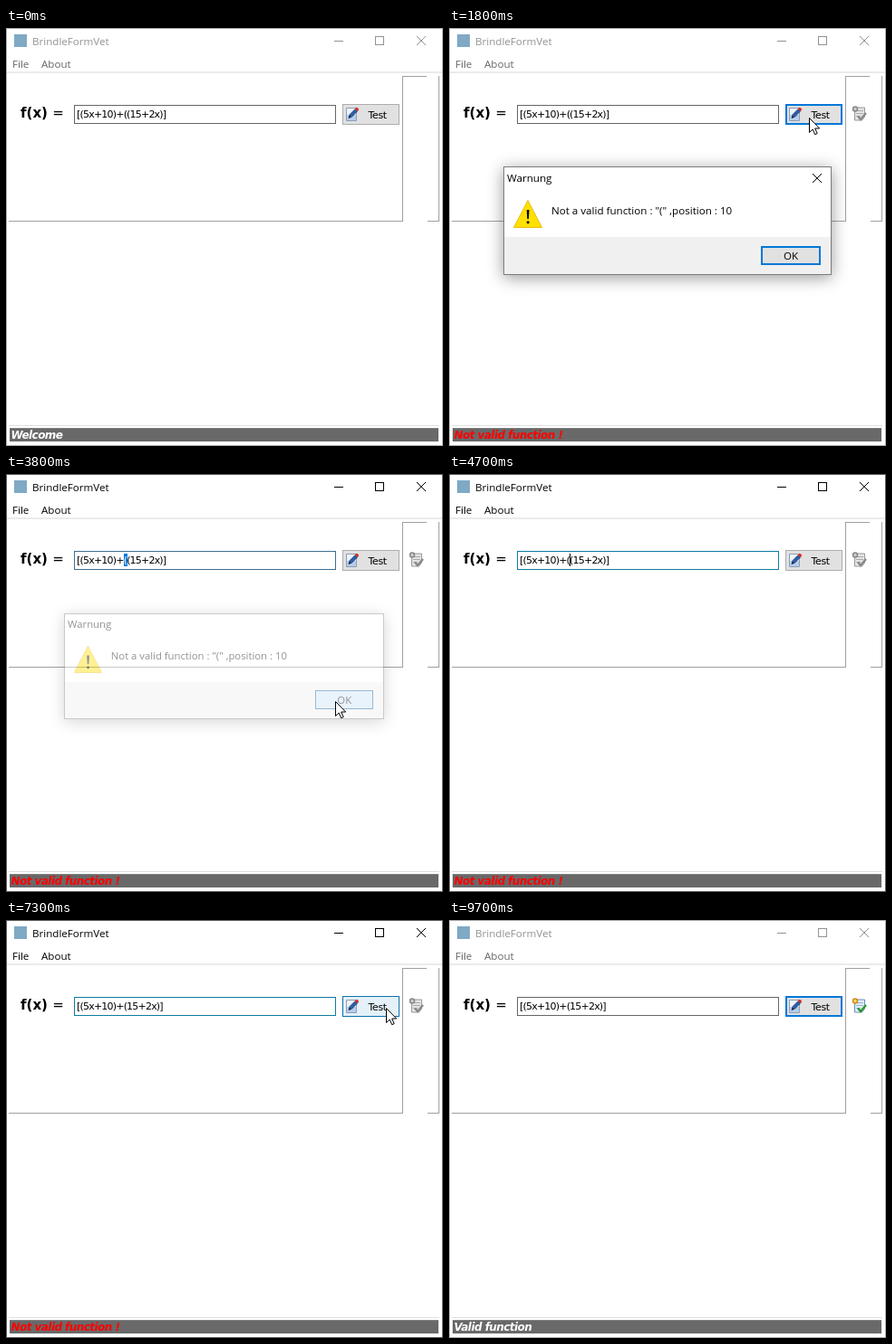
Animation of 482x462 px, one loop 9800 ms. Source, as an HTML page:

```html
<!DOCTYPE html>
<html lang="en">
<head>
<meta charset="utf-8">
<title>BrindleFormVet</title>
<style>
html, body { margin: 0; width: 100%; height: 100%; overflow: hidden; background: #fff; }
svg { display: block; width: 482px; height: 462px; }
text { white-space: pre; }
.ui { font: 11.6px "Open Sans", "Noto Sans", sans-serif; }
.form { font: 11px "DejaVu Sans", sans-serif; letter-spacing: -.8px; }
.fx { font: bold 15px "DejaVu Sans", sans-serif; }
.status { font: italic bold 12px "DejaVu Sans", sans-serif; letter-spacing: -.55px; }
.crisp { shape-rendering: crispEdges; }
#dialog { filter: drop-shadow(0 3px 9px rgba(0, 0, 0, .4)); }
</style>
</head>
<body>
<svg viewBox="0 0 482 462">
  <rect width="482" height="462" fill="#fff"/>

  <g class="crisp" fill="none">
    <rect id="frame" x=".5" y=".5" width="481" height="461"/>
    <path d="M1 49H481" stroke="#ebebeb" stroke-width="2"/>
    <path d="M3 213.500H437.500V53.500H464M477.500 53V213.500H465" stroke="#a0a0a0"/>
    <path d="M3 439.500H478" stroke="#dedede"/>
  </g>

  <rect x="9" y="7" width="14" height="14" fill="#7fa9c4"/>
  <text id="title" class="ui" x="29" y="19">BrindleFormVet</text>
  <g id="menu" class="ui"><text x="7" y="44">File</text><text x="39" y="44">About</text></g>
  <g id="controls" fill="none">
    <path class="crisp" d="M362 14.500h10M407.500 9.500h9v9h-9z"/>
    <path d="M453 9l10 10M463 9l-10 10"/>
  </g>

  <text class="fx" x="16" y="98.500">f(x) <tspan font-weight="normal">=</tspan></text>
  <rect id="field" class="crisp" x="75.500" y="85.500" width="288" height="20" fill="#fff"/>
  <rect id="mark" class="crisp" y="88" height="14" fill="#0078d7"/>
  <text id="input" class="form" x="78" y="99"><tspan></tspan><tspan></tspan><tspan></tspan></text>

  <rect id="test" class="crisp"/>
  <g id="edit">
    <path d="M375.500 88.500h11v14h-11z" fill="#edf3fb" stroke="#8d9db5"/>
    <path d="M376 96h10v6h-10z" fill="#b5cdec"/>
    <path d="M378 99.500l1.200-4 6-6 2.400 2.400-6 6.200z" fill="#2f5fa8" stroke="#203c70" stroke-width=".8"/>
    <path d="M384.800 89.500l1.600-1.700q2.600.2 2.800 2.600l-1.600 1.700z" fill="#d83020"/>
    <path d="M378 99.500l.8-2.700 2 1.700z" fill="#222"/>
  </g>
  <text class="form" x="399.500" y="100" style="letter-spacing:-.35px">Test</text>

  <g id="result" transform="translate(-1 -.5)">
    <path id="sheet" d="M448.500 88.500h11v10l-3 4h-8z"/>
    <path id="lines" d="M450 92h8M450 95h8M450 98h5" fill="none"/>
    <circle id="gear" cx="449" cy="90" r="2.500" stroke-width="1.500"/>
    <path id="tick" d="M452 98l3 3.500 6-7" fill="none" stroke-width="2.200"/>
  </g>

  <rect class="crisp" x="4" y="442" width="473" height="15" fill="#696969"/>
  <path class="crisp" d="M4 442.500H477" stroke="#808080"/>
  <text id="status" class="status" x="5.500" y="454"></text>

  <g id="dialog">
    <rect class="crisp" x="60.500" y="153.500" width="361" height="119" fill="#fff" stroke="#7c7c7c"/>
    <rect class="crisp" x="61" y="231" width="360" height="41" fill="#f0f0f0"/>
    <text class="ui" x="64" y="170">Warnung</text>
    <path id="close" d="M401 161l10 10M411 161l-10 10" stroke="#000"/>
    <path d="M87 190.500L102.500 220.500H71.500z" fill="#ffe000" stroke="#e8bd10" stroke-linejoin="round"/>
    <path d="M85.700 201h2.800l-.6 10h-1.600z"/>
    <circle cx="87.100" cy="214.800" r="1.500"/>
    <text class="ui" x="113" y="206">Not a valid function : "(" ,position : 10</text>
    <rect id="ok" class="crisp"/>
    <text class="ui" x="377" y="256" text-anchor="middle">OK</text>
  </g>

  <path id="pointer" d="M.5.5V16.500L4.200 13 6.700 18.700 9.200 17.600 6.700 12H11.700z" fill="#fff" stroke="#000"/>
</svg>
<script>
const LOOP = 9800, TICK = 100;
const $ = id => document.getElementById(id);
const set = (id, attrs) => { for (const k in attrs) $(id).setAttribute(k, attrs[k]); };

// Pointer stops: time, x, y
const PATH = [
  [100, 456, 442], [400, 456, 442], [600, 448, 380], [700, 448, 380],
  [1100, 397, 99], [2200, 397, 99], [2800, 363, 254], [2900, 363, 254],
  [3100, 365, 252], [3200, 365, 252], [3600, 363, 251], [5600, 363, 251],
  [5900, 462, 203], [6500, 426, 97], [6600, 426, 97], [7000, 419, 97],
  [8200, 419, 97], [9000, 437, 436]
];

// Step tables: [start, value]
const ACTIVE = [[0, false], [1300, true], [1400, false], [3800, true], [9700, false]];
const POINTER = [[0, false], [100, true], [4500, false], [5700, true], [9500, false]];
const STATUS = [[0, ["Welcome", "#fff"]], [1400, ["Not valid function !", "#f00"]], [7600, ["Valid function", "#fff"]]];
const RESULT = [[0, "none"], [1400, "grey"], [7600, "colour"]];
const TEST = [
  [0, "plain"], [1100, "hover"], [1300, "press"], [1500, "fade"], [1700, "focus"],
  [3800, "plain"], [6400, "hover"], [7500, "press"], [7700, "hover"], [8300, "focus"]
];
const OK = [[0, "focus"], [3000, "hover"], [3500, "press"]];
const FIELD = [[0, "#666"], [3800, "#3f6f8f"], [3900, "#0f7c9f"], [7500, "#666"]];
const DIALOG = [
  [0, [0, 1]], [1500, [.3, .945]], [1600, [.75, .985]], [1700, [1, 1]],
  [3800, [.42, .975]], [3900, [.13, .95]], [4000, [0, 1]]
];
// before, selected, after
const HEAD = "[(5x+10)+", TAIL = "(15+2x)]";
const INPUT = [
  [0, [HEAD, "", "(" + TAIL]], [3800, [HEAD, "(", TAIL]],
  [4500, [HEAD + "(", "", TAIL]], [5300, [HEAD, "", TAIL]]
];
const CARET = [[0, false], [4500, true], [5000, false], [5300, true], [5500, false]];

const SKIN = {
  plain: ["#e1e1e1", "#adadad", 1],
  hover: ["#e5f1f9", "#0b72ac", 1],
  press: ["#cce4f7", "#005499", 1],
  fade: ["#d6e3ed", "#0068bb", 2],
  focus: ["#e1e1e1", "#0078d7", 2]
};

const at = (table, t) => table.filter(s => s[0] <= t).pop()[1];

function place(t) {
  const i = PATH.findIndex(p => p[0] > t);
  if (i < 1) return (i ? PATH[PATH.length - 1] : PATH[0]).slice(1);
  const [t0, x0, y0] = PATH[i - 1], [t1, x1, y1] = PATH[i];
  const u = (t - t0) / (t1 - t0), s = u * u * (3 - 2 * u);
  return [Math.round(x0 + (x1 - x0) * s), Math.round(y0 + (y1 - y0) * s)];
}

function button(id, x, y, w, h, skin) {
  const [fill, stroke, line] = SKIN[skin], half = line / 2;
  set(id, {
    x: x + half, y: y + half, width: w - line, height: h - line,
    fill, stroke, "stroke-width": line
  });
}

function drawInput(t) {
  const parts = at(INPUT, t), spans = $("input").children;
  parts.forEach((s, i) => { spans[i].textContent = s; });
  spans[1].setAttribute("fill", "#fff");
  const caret = at(CARET, t), n = parts[0].length;
  const end = $("input").getSubStringLength(0, n);
  const wide = parts[1] ? $("input").getSubStringLength(n, 1) : 0;
  set("mark", {
    x: Math.round(78 + end), width: parts[1] ? Math.ceil(wide) : caret ? 1 : 0,
    fill: parts[1] ? "#0078d7" : "#000"
  });
}

function drawResult(kind) {
  const c = kind === "colour";
  set("result", { display: kind === "none" ? "none" : "inline" });
  set("sheet", { fill: c ? "#e4effb" : "#e4e4e4", stroke: c ? "#6b8fbd" : "#999" });
  set("lines", { stroke: c ? "#8fb0d8" : "#aaa" });
  set("gear", { fill: c ? "#ffd56a" : "#ccc", stroke: c ? "#d48a1c" : "#888" });
  set("tick", { stroke: c ? "#269526" : "#858585" });
}

function draw(t) {
  const on = at(ACTIVE, t);
  set("frame", { stroke: on ? "#5a5a5a" : "#a8a8a8" });
  set("title", { fill: on ? "#000" : "#929292" });
  set("menu", { fill: on ? "#000" : "#666" });
  set("controls", { stroke: on ? "#000" : "#929292" });
  set("field", { stroke: at(FIELD, t) });
  drawInput(t);
  button("test", 371, 84, 63, 23, at(TEST, t));
  button("ok", 344, 241, 66, 21, at(OK, t));
  drawResult(at(RESULT, t));

  const [label, fill] = at(STATUS, t);
  $("status").textContent = label;
  set("status", { fill });

  const [opacity, k] = at(DIALOG, t);
  set("dialog", {
    opacity, display: opacity ? "inline" : "none",
    transform: `translate(225 180) scale(${k}) translate(-225 -180)`
  });
  set("close", { display: on ? "none" : "inline" });

  set("pointer", {
    display: at(POINTER, t) ? "inline" : "none",
    transform: `translate(${place(t)})`
  });
}

const start = performance.now();
let last = -1;
function loop() {
  const t = Math.floor((performance.now() - start) % LOOP / TICK) * TICK;
  if (t !== last) draw(last = t);
  requestAnimationFrame(loop);
}
loop();
</script>
</body>
</html>
```
